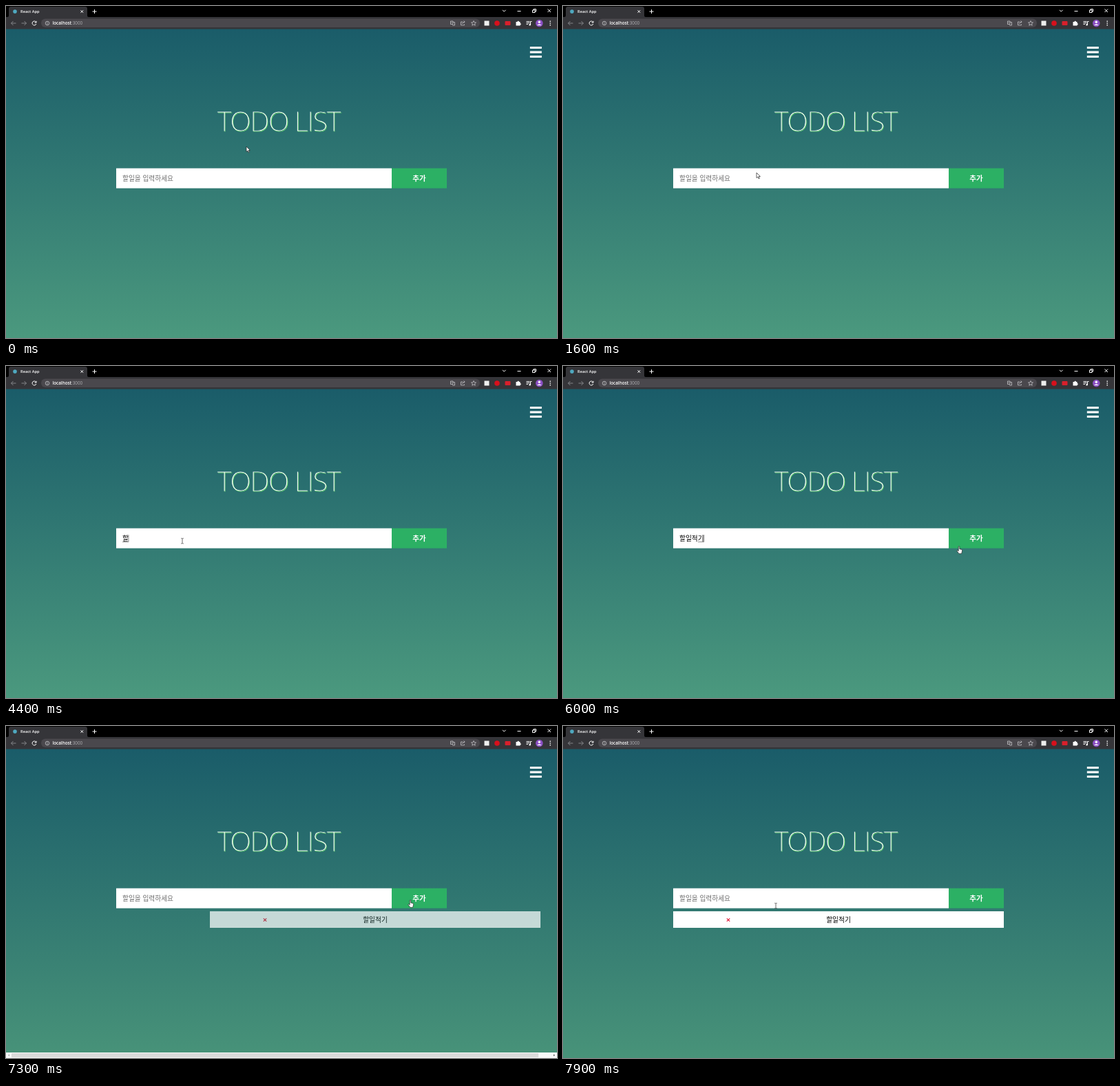
Write an HTML page that moves like this. It is 800x482 px and loops after 8000 ms.

```html
<!DOCTYPE html>
<html lang="ko">
<head>
<meta charset="utf-8">
<title>Todo list</title>
<style>
html, body { margin: 0; width: 100%; height: 100%; overflow: hidden; background: #000; }
svg { display: block; width: 800px; height: 482px; }
text { font-family: "Noto Sans CJK KR", "Noto Sans CJK", "Noto Sans", sans-serif; white-space: pre; }
.ui { font-family: "Open Sans", "Noto Sans", sans-serif; fill: #fff; font-weight: 600; }
.title { font: 300 40.5px "Open Sans", "Noto Sans", sans-serif; letter-spacing: -1.95px; }
.line { fill: none; stroke: #fff; stroke-width: 1; }
.dim { stroke: #85868a; }
.soft { stroke: #c4c4c8; stroke-width: .8; }
</style>
</head>
<body>
<svg viewBox="0 0 800 482">
  <defs>
    <linearGradient id="bg" x1="0" y1="0" x2="0" y2="1">
      <stop stop-color="#1a5c69"/><stop id="low" offset="1" stop-color="#4b997e"/>
    </linearGradient>
    <!-- the black outline thins the letters -->
    <mask id="thin" maskUnits="userSpaceOnUse" x="290" y="140" width="220" height="60">
      <text class="title" x="306.500" y="182.300" fill="#fff" stroke="#000" stroke-width=".9">TODO LIST</text>
    </mask>
  </defs>
  <rect y="33" width="800" height="449" fill="url(#bg)"/>

  <!-- browser frame -->
  <path d="M0 16H2Q4 16 4 14V4Q4 1 7 1H115Q118 1 118 4V14Q118 16 120 16H800V33.500H0Z" fill="#353539"/>
  <circle cx="13" cy="8" r="2.800" fill="#4fa9c0"/>
  <text class="ui" x="21" y="10.300" font-size="5.700">React App</text>
  <path class="line" d="M108.500 6.200l3.600 3.600m0-3.600l-3.600 3.600M125.500 8h6m-3-3v6M721 5.800l2.300 2.300l2.300-2.300M742.500 7.500h5M764.500 6h3.500v3.500h-3.500zM766 6v-1.500h3.500v3.500h-1.500M786.500 4.500l4.500 4.500m0-4.500l-4.500 4.500"/>
  <rect x="51" y="18.500" width="637" height="12.500" rx="6.200" fill="#4a484d"/>
  <path class="line dim" d="M14.500 25h-7m3-3l-3 3l3 3M22.500 25h7m-3-3l3 3l-3 3"/>
  <path class="line" d="M43.700 23.500a3 3 0 1 0 .2 2.500M44 21.800v2.300h-2.400"/>
  <circle class="line soft" cx="60" cy="25" r="2.800"/>
  <path class="line soft" d="M60 24.500v2.200M60 23v.8"/>
  <text class="ui" x="67.500" y="27.300" font-size="6.300">localhost<tspan fill="#b0b0b4" font-weight="400">:3000</tspan></text>
  <path class="line soft" d="M645.500 22h3.500v4.500h-3.500zM649 23.500h2.500v4.500h-3.500M646.500 24h1.500M663 23h-2.500v4.800h5v-1.500M662.500 26q.3-3 3.500-3m-1.500-1.500l1.700 1.500l-1.700 1.500"/>
  <path class="line soft" d="M679 21.500l1 2.300l2.500.2l-1.900 1.700l.6 2.500l-2.200-1.400l-2.200 1.400l.6-2.500l-1.900-1.700l2.500-.2z"/>
  <rect x="694.500" y="21.500" width="7" height="7" fill="#eee"/>
  <circle cx="713" cy="25" r="3.800" fill="#d8101c"/>
  <rect x="724.500" y="22" width="8" height="6" rx="1" fill="#d8202c"/>
  <path d="M740.500 23h2a1.200 1.200 0 0 1 2.400 0h1.600v2a1.200 1.200 0 0 1 0 2.400v1.100h-6z" fill="#fff"/>
  <path class="line" d="M755.500 22.500h5M755.500 24.500h5M755.500 26.500h2.500M761.500 27v-4.500h2"/>
  <circle cx="760.600" cy="27.300" r="1.200" fill="#fff"/>
  <circle cx="774.300" cy="25" r="5.300" fill="#8c50c4"/>
  <circle cx="774.300" cy="23.300" r="1.700" fill="#fff"/>
  <path d="M771 28q3.300-3.600 6.600 0z" fill="#fff"/>
  <path d="M789.500 21.500h1.400v1.400h-1.400zM789.500 24.300h1.400v1.400h-1.400zM789.500 27.100h1.400v1.400h-1.400z" fill="#fff"/>

  <!-- page -->
  <path d="M760.800 60.500h17M760.800 67h17M760.800 73.500h17" stroke="#fff" stroke-width="2.800"/>
  <rect x="290" y="140" width="220" height="60" fill="#6be070" mask="url(#thin)" transform="translate(.8 .8)"/>
  <rect x="290" y="140" width="220" height="60" fill="#fff" mask="url(#thin)"/>
  <rect x="160" y="235.600" width="400" height="29" fill="#fff"/>
  <rect x="560" y="235.600" width="80" height="29" fill="#2cb064"/>
  <text x="600" y="254" font-size="10.500" font-weight="700" fill="#fff" text-anchor="middle">추가</text>
  <text id="field" x="169" y="253.700" font-size="9.700"></text>
  <path id="mark" fill="none" stroke="#555" stroke-width=".7"/>
  <path id="caret" d="M168.800 244.500v11" stroke="#222" stroke-width=".8"/>
  <g id="item">
    <rect x="160" y="269" width="480" height="24" fill="#fff"/>
    <path d="M237.800 279.300l4.400 4.400m0-4.400l-4.400 4.400" stroke="#e01030" stroke-width="1.100"/>
    <text x="400" y="285" font-size="9.700" text-anchor="middle">할일적기</text>
  </g>
  <g id="bar">
    <rect y="474" width="800" height="8" fill="#f8f8f8"/>
    <rect id="thumb" x="8" y="475" height="6" fill="#dadada"/>
    <path d="M5 476.500l-2 1.500l2 1.500z" fill="#aaa"/>
    <path d="M795 476.500l2 1.500l-2 1.500z" fill="#555"/>
  </g>

  <!-- pointers, tip or centre at 0,0 -->
  <path id="arrow" d="M0 0v7.600l1.800-1.600l1.300 2.800l1.300-.6l-1.300-2.700h2.300z" fill="#fff" stroke="#222" stroke-width=".7"/>
  <path id="beam" d="M-1.800-3.800h1.300l.5.500l.5-.5h1.300M-1.800 3.800h1.300l.5-.5l.5.500h1.300M0-3.300v6.600" fill="none" stroke="#444" stroke-width=".8"/>
  <path id="hand" d="M-.8 0q.8-1 1.600 0v3.700l3 .7q1 .3.900 1.300l-.6 3l-.6 1.700h-3.600l-3-3.900q.2-1.300 1.400-.6l.9.800z" fill="#fff" stroke="#222" stroke-width=".7"/>
</svg>
<script>
const $ = id => document.getElementById(id);
const show = (id, on) => $(id).setAttribute("visibility", on ? "visible" : "hidden");
const hint = "할일을 입력하세요";

// time, x, y
const path = [
  [0, 349, 204], [300, 309, 226], [400, 309, 226], [1100, 284, 243], [1200, 284, 243],
  [1600, 281, 242], [2000, 292, 131], [2100, 295, 140], [2600, 256, 254], [5500, 256, 254],
  [6000, 575, 262], [6300, 582, 254], [6400, 582, 254], [7000, 586, 253], [7300, 587, 253],
  [7400, 580, 255], [7700, 340, 266], [7800, 340, 266], [7900, 309, 261]
];
const typed = [
  [3500, "ㅎ"], [3900, "하"], [4200, "할"], [4500, "할ㅇ"], [4600, "할이"], [4700, "할일"],
  [4900, "할일ㅈ"], [5000, "할일저"], [5100, "할일적"], [5200, "할일적ㄱ"], [5300, "할일적기"], [7200, hint]
];

function place(t) {
  const i = path.findIndex(p => p[0] >= t);
  if (i < 1) return path[i ? path.length - 1 : 0].slice(1);
  const [t0, x0, y0] = path[i - 1], [t1, x1, y1] = path[i];
  const k = (t - t0) / (t1 - t0);
  return [x0 + (x1 - x0) * k, y0 + (y1 - y0) * k];
}

// cubic-bezier(.25, .1, .25, 1)
function ease(x) {
  x = Math.min(1, Math.max(0, x));
  const curve = (s, a, b) => 3 * s * (1 - s) ** 2 * a + 3 * s * s * (1 - s) * b + s ** 3;
  let lo = 0, hi = 1;
  for (let i = 0; i < 20; i++) {
    const mid = (lo + hi) / 2;
    if (curve(mid, .25, .25) < x) lo = mid; else hi = mid;
  }
  return curve(lo, .1, 1);
}
const slide = t => ease((t - 7130) / 400);

function draw(now) {
  const t = Math.floor(now % 8000 / 100) * 100;

  const [x, y] = place(t);
  const kind = t < 2500 ? "arrow" : t >= 5900 && t < 7500 ? "hand" : "beam";
  for (const id of ["arrow", "beam", "hand"]) show(id, id === kind);
  $(kind).setAttribute("transform", `translate(${x} ${y})`);

  const text = typed.reduce((s, [at, v]) => t >= at ? v : s, hint);
  const typing = text !== hint;
  $("field").textContent = text;
  $("field").setAttribute("fill", typing ? "#000" : "#6c6c6c");
  show("caret", t >= 2500 && t < 3100);
  show("mark", typing);
  const end = 169 + text.length * 8.92;
  $("mark").setAttribute("d", `M${end - 8.9} 255.300H${end}V245`);

  const added = t >= 7200, k = slide(t);
  show("item", added);
  $("item").setAttribute("transform", `translate(${480 * (1 - k)} 0)`);
  $("item").setAttribute("opacity", k);
  const width = 640 + 480 * (1 - slide(t - 25)); // layout trails the slide a little
  show("bar", added && width > 800);
  $("thumb").setAttribute("width", 784 * 800 / width);
  $("low").setAttribute("stop-color", added ? "#489379" : "#4b997e");
  requestAnimationFrame(() => draw(performance.now()));
}
draw(performance.now());
</script>
</body>
</html>
```
